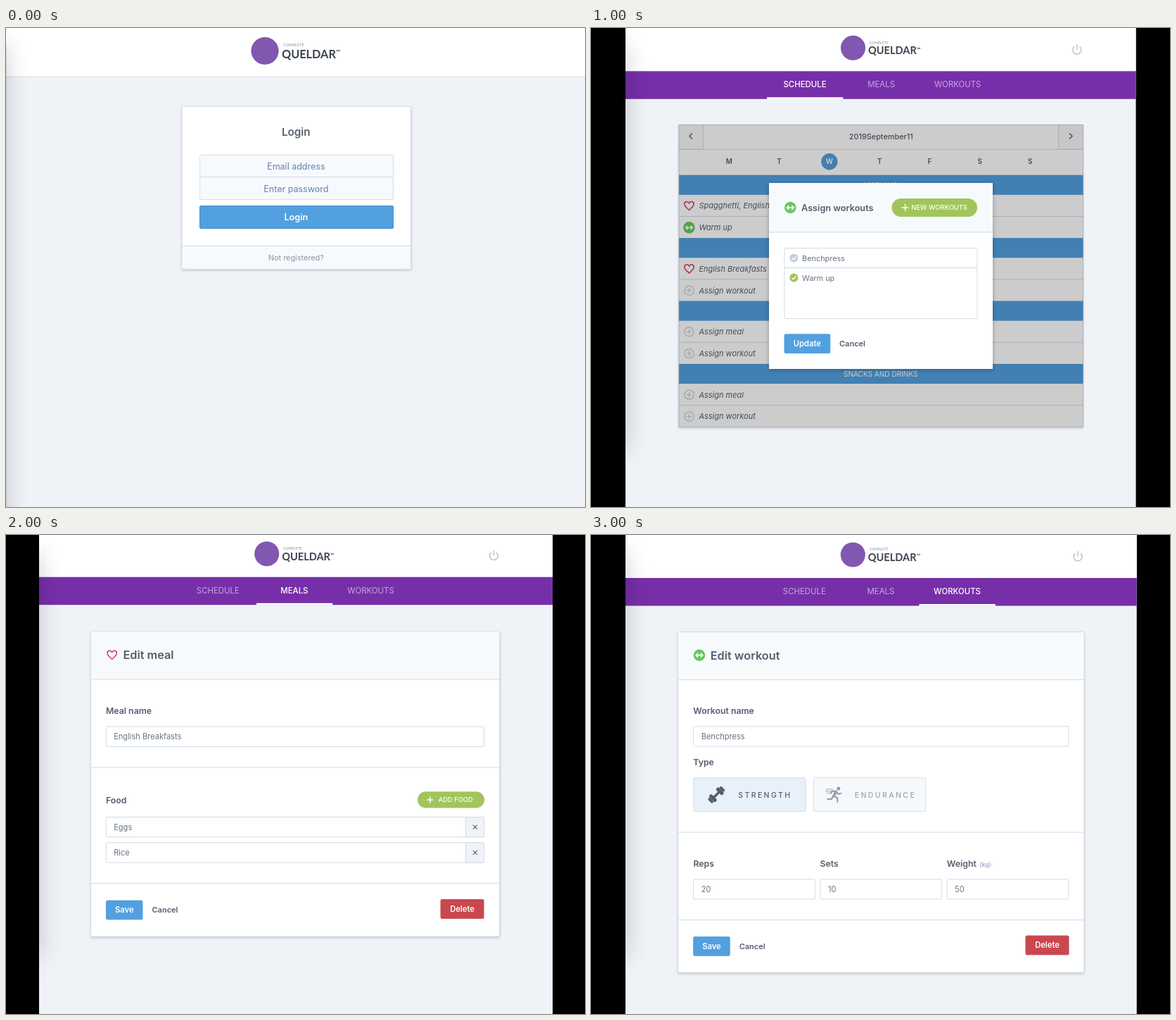
These frames come from a looping animation (823x680 px, 3.5 s). An HTML page with a canvas:

```html
<!DOCTYPE html>
<html lang="en">
<head>
<meta charset="utf-8">
<title>Fitness planner tour</title>
<style>
html, body { margin: 0; width: 100%; height: 100%; overflow: hidden; }
canvas { display: block; width: 823px; height: 680px; }
</style>
</head>
<body>
<canvas id="stage" width="823" height="680"></canvas>
<script>
const ctx = document.getElementById('stage').getContext('2d');
const W = 823, H = 680, HOLD = 500;
const C = {
  page: '#eff3f8', pale: '#f7fafd', line: '#d2dbe5', ink: '#545e6f', soft: '#687384',
  hint: '#a0aec4', blue: '#52a0e0', purple: '#772fa9', lime: '#a1c55c',
  green: '#67c85d', red: '#c9474f', pink: '#d13a65', grey: '#c4cbd6', logo: '#8157b0'
};

function text(str, x, y, size, o = {}) {
  ctx.font = `${o.italic ? 'italic ' : ''}${o.weight || 400} ${size}px ${o.font || 'Inter'}, sans-serif`;
  ctx.textAlign = o.align || 'left';
  ctx.letterSpacing = (o.spacing || 0) + 'px';
  ctx.fillStyle = o.color || C.ink;
  ctx.fillText(str, x, y + size * 0.36);
  ctx.letterSpacing = '0px';
}
const center = (str, x, y, size, o) => text(str, x, y, size, { align: 'center', ...o });

function rect(l, t, r, b, fill) {
  ctx.fillStyle = fill;
  ctx.fillRect(l, t, r - l, b - t);
}

function box(l, t, r, b, fill, border = C.line, radius = 1.5) {
  ctx.beginPath();
  ctx.roundRect(l + 0.5, t + 0.5, r - l - 1, b - t - 1, radius);
  ctx.fillStyle = fill;
  ctx.fill();
  ctx.lineWidth = 1;
  ctx.strokeStyle = border;
  ctx.stroke();
}

function shadowed(blur, dy, color, draw) {
  ctx.save();
  ctx.shadowColor = color;
  ctx.shadowBlur = blur;
  ctx.shadowOffsetY = dy;
  draw();
  ctx.restore();
}

function card(l, t, r, b) {
  shadowed(4, 1.5, 'rgba(0,0,0,.2)', () => rect(l + 0.5, t + 0.5, r - 0.5, b - 0.5, '#fff'));
  box(l, t, r, b, '#fff');
}

const hLine = (l, r, y) => rect(l, y - 0.5, r, y + 0.5, C.line);
const vLine = (x, t, b) => rect(x - 0.5, t, x + 0.5, b, C.line);

function disc(x, y, r, fill) {
  ctx.beginPath();
  ctx.arc(x, y, r, 0, Math.PI * 2);
  ctx.fillStyle = fill;
  ctx.fill();
}

function stroke(color, width, ...paths) {
  ctx.beginPath();
  for (const points of paths) points.forEach(([x, y], i) => i ? ctx.lineTo(x, y) : ctx.moveTo(x, y));
  ctx.strokeStyle = color;
  ctx.lineWidth = width;
  ctx.stroke();
}

function at(x, y, draw, scale = 1, angle = 0) {
  ctx.save();
  ctx.translate(x, y);
  ctx.scale(scale, scale);
  ctx.rotate(angle);
  draw();
  ctx.restore();
}

const plus = (x, y, r, color, width) =>
  stroke(color, width, [[x - r, y], [x + r, y]], [[x, y - r], [x, y + r]]);

const heart = (x, y, s = 1) => at(x, y, () => {
  ctx.beginPath();
  ctx.moveTo(0, 6);
  ctx.bezierCurveTo(-4, 2.5, -6.7, 0.6, -6.7, -2.4);
  ctx.bezierCurveTo(-6.7, -6.6, -1.8, -7.2, 0, -3.8);
  ctx.bezierCurveTo(1.8, -7.2, 6.7, -6.6, 6.7, -2.4);
  ctx.bezierCurveTo(6.7, 0.6, 4, 2.5, 0, 6);
  ctx.closePath();
  ctx.strokeStyle = C.pink;
  ctx.lineWidth = 1.5;
  ctx.stroke();
}, s);

const workoutIcon = (x, y) => at(x, y, () => {
  disc(0, 0, 8.3, C.green);
  stroke('#fff', 1.7, [[-4, 0], [4, 0]], [[-2, -2.8], [-4.8, 0], [-2, 2.8]], [[2, -2.8], [4.8, 0], [2, 2.8]]);
});

function addIcon(x, y) {
  ctx.beginPath();
  ctx.arc(x, y, 6.6, 0, Math.PI * 2);
  ctx.strokeStyle = C.grey;
  ctx.lineWidth = 1.2;
  ctx.stroke();
  plus(x, y, 3.6, C.grey, 1.2);
}

function check(x, y, color) {
  disc(x, y, 6.1, color);
  stroke('#fff', 1.4, [[x - 2.9, y + 0.2], [x - 0.9, y + 2.2], [x + 3, y - 2]]);
}

function trash(x, y) {
  rect(x - 5.2, y - 6.6, x + 5.2, y - 5, C.red);
  rect(x - 2, y - 7.3, x + 2, y - 6, C.red);
  ctx.beginPath();
  ctx.roundRect(x - 4.5, y - 4.2, 9, 11, [0, 0, 1.5, 1.5]);
  ctx.fillStyle = C.red;
  ctx.fill();
}

function power(x, y) {
  ctx.beginPath();
  ctx.arc(x, y + 0.5, 6, -0.9, Math.PI + 0.9);
  ctx.strokeStyle = '#c4c5c8';
  ctx.lineWidth = 1.6;
  ctx.stroke();
  stroke('#c4c5c8', 1.6, [[x, y - 7.3], [x, y]]);
}

const dumbbell = (x, y) => at(x, y, () => {
  rect(-6, -1.7, 6, 1.7, C.ink);
  for (const side of [-1, 1]) {
    box(side * 7 - 2.6, -6.3, side * 7 + 2.6, 6.3, C.ink, C.ink);
    box(side * 11.5 - 2, -4.5, side * 11.5 + 2, 4.5, C.ink, C.ink);
  }
}, 1, -Math.PI / 4);

const runner = (x, y) => at(x, y, () => {
  const tone = '#939daa';
  ctx.lineJoin = ctx.lineCap = 'round';
  disc(6.5, -8.7, 2.5, tone);
  stroke(tone, 3.6, [[3, -4.5], [-0.5, 2]]);
  stroke(tone, 2.2, [[2.5, -5], [-2.5, -5.5], [-4.5, -2]], [[3.5, -4], [6, -1], [10, -2]],
    [[0, 2], [5, 4.5], [5, 10]], [[-1, 2], [-3.5, 6], [-9, 6]]);
  stroke(tone, 0.9, [[-11, -8], [-2, -8]], [[-12, -5.2], [-5, -5.2]], [[-10, -2.4], [-6, -2.4]]);
});

function pill(l, t, r, b, label, labelX, size = 9.3) {
  const y = (t + b) / 2;
  ctx.beginPath();
  ctx.roundRect(l, t, r - l, b - t, (b - t) / 2);
  ctx.fillStyle = C.lime;
  ctx.fill();
  plus(labelX - (size > 9.3 ? 8.7 : 11.7), y, size > 9.3 ? 5 : 4.5, '#fff', 1.5);
  text(label, labelX, y, size, { color: '#fff', weight: 500 });
}

function button(l, t, r, b, label, fill = C.blue) {
  box(l, t, r, b, fill, fill);
  center(label, (l + r) / 2, (t + b) / 2, 11.2, { color: '#fff', weight: 600 });
}

const label = (str, x, y, size = 12.3) => text(str, x, y, size, { weight: 600 });

function field(l, t, r, b, value) {
  box(l, t, r, b, '#fff');
  text(value, l + 11.5, (t + b) / 2, 11.05, { color: C.soft });
}

const logo = (x, y, scale) => at(x, y, () => {
  disc(0, 0, 19.6, C.logo);
  text('COMPLETE', 26, -8.5, 6.1, { font: 'Lato', italic: true, color: '#8c8f98' });
  text('QUELDAR', 24, 4.4, 16.3, { font: 'Lato', weight: 700, color: '#3c4350' });
  text('™', 101, 2, 8, { font: 'Lato', weight: 700, color: '#3c4350' });
}, scale);

// Soft shadow cast onto the page by a window to its left.
function edgeShade(left, top, bottom) {
  ctx.save();
  ctx.beginPath();
  ctx.rect(left, 0, W, H);
  ctx.clip();
  shadowed(32, 0, 'rgba(0,0,0,.2)', () => rect(left - 200, top, left, bottom, '#000'));
  ctx.restore();
}

function shell({ left, right, nav, tabs, active, logoX, side = '#000' }) {
  rect(0, 0, W, H, side);
  rect(left, 0, right, H, C.page);
  rect(left, 0, right, nav, '#fff');
  rect(left, nav, right, nav + 39.5, C.purple);
  logo(logoX, nav - 33, 0.895);
  power(right - 83.7, nav - 30.7);
  ['SCHEDULE', 'MEALS', 'WORKOUTS'].forEach((name, i) => {
    const x = tabs + i * 108.6, on = i === active;
    center(name, x, nav + 19, 11.4, { color: on ? '#fff' : '#c6a6dc', weight: on ? 500 : 400 });
    if (on) rect(x - 54, nav + 37, x + 54.3, nav + 39.7, '#fff');
  });
  edgeShade(left, 25, 600);
}

function panelHead(l, t, r, title, icon) {
  rect(l + 1, t + 1, r - 1, t + 68, C.pale);
  hLine(l, r, t + 68.5);
  icon(l + 30.7, t + 33.7);
  text(title, l + 46.4, t + 34, 16.3, { weight: 600 });
}

function listPanel(l, t, r, title, icon, items) {
  card(l, t, r, t + 159.7);
  panelHead(l, t, r, title, icon);
  items.forEach(([name, detail], i) => {
    const y = t + 68.5 + i * 45.5;
    rect(r - 40, y + 0.5, r - 1, y + 45, C.pale);
    vLine(r - 40, y, y + 45.5);
    if (i) hLine(l, r, y);
    trash(r - 20, y + 22);
    text(name, l + 14.3, y + 17.2, 11.05);
    text(detail, l + 14.3, y + 30.5, 8.6, { italic: true, color: C.hint });
  });
}

function formButtons(l, y) {
  button(l, y - 14, l + 52.5, y + 13.7, 'Save');
  text('Cancel', l + 65.5, y, 11, { weight: 600 });
  button(617.5, y - 15.5, 679.5, y + 12.3, 'Delete', C.red);
}

function schedule() {
  const l = 123, r = 701;
  card(l, 137, r, 569);
  for (const [a, b] of [[l, l + 36], [r - 36, r]]) box(a, 137, b, 173, '#f8f9fa');
  hLine(l, r, 172.5);
  stroke(C.ink, 1.4, [[142.5, 149.5], [138.5, 153.5], [142.5, 157.5]], [[681, 149.5], [685, 153.5], [681, 157.5]]);
  center('2019September11', 412, 154, 10.9, { weight: 500 });
  disc(338.3, 190, 11.7, C.blue);
  [...'MTWTFSS'].forEach((day, i) =>
    center(day, 195 + i * 71.65, 190, 10, { weight: 600, color: i === 2 ? '#fff' : C.ink }));

  const sections = [
    ['MORNING', 'Spagghetti, English Breakfasts', 'Warm up'],
    ['LUNCH', 'English Breakfasts', 'Assign workout'],
    ['EVENING', 'Assign meal', 'Assign workout'],
    ['SNACKS AND DRINKS', 'Assign meal', 'Assign workout']
  ];
  sections.forEach(([name, meal, workout], i) => {
    const y = 209 + i * 89.8;
    rect(l + 0.5, y, r - 0.5, y + 28.3, C.blue);
    center(name, 411.5, y + 14.3, 10.1, { color: '#fff' });
    hLine(l, r, y + 59);
    [meal, workout].forEach((item, j) => {
      const mid = y + 44 + j * 31;
      const icon = item.startsWith('Assign') ? addIcon : j ? workoutIcon : heart;
      icon(138, mid);
      text(item, 152, mid, 11.05, { italic: true });
    });
  });
}

function loginScene() {
  rect(0, 0, W, H, C.page);
  rect(0, 0, W, 69, '#fff');
  hLine(0, W, 69.5);
  logo(368, 32.5, 1);
  edgeShade(0, 25, 900);
  rect(0, 25, 1, H, 'rgba(0,0,0,.1)');
  card(249.5, 111, 576, 343);
  rect(250.5, 310, 575, 342, C.pale);
  hLine(250, 575.5, 309.5);
  center('Login', 412.3, 148, 15.2, { weight: 600 });
  box(275, 179.5, 551, 244, C.pale, '#d5dfec');
  hLine(275, 551, 211.5);
  center('Email address', 412.3, 196, 12.5, { color: '#667fae' });
  center('Enter password', 412.3, 228, 12.5, { color: '#667fae' });
  box(275, 252, 551, 285, C.blue, '#478fcb');
  center('Login', 412.3, 268.5, 12.6, { color: '#fff', weight: 600 });
  center('Not registered?', 412.3, 326.3, 10.9, { color: '#8a94a3' });
}

function scheduleScene() {
  shell({ left: 48, right: 776, nav: 61, tabs: 303, active: 0, logoX: 372, side: '#383d4b' });
  schedule();
}

function assignScene() {
  shell({ left: 49, right: 774.5, nav: 61.3, tabs: 304, active: 0, logoX: 372.5 });
  at(2.1, 0.6, schedule, 0.9955);
  rect(124.5, 137, 700, 567, 'rgba(0,0,0,.2)');
  shadowed(6, 1, 'rgba(0,0,0,.3)', () => rect(253, 220, 571, 484, '#fff'));
  rect(253, 220, 571, 290, C.pale);
  hLine(253, 571, 290);
  workoutIcon(283.3, 255);
  label('Assign workouts', 299, 255, 12.7);
  pill(427.5, 242, 549, 268, 'NEW WORKOUTS', 455.3, 9.4);
  box(274.5, 312, 549.5, 413, '#fff');
  hLine(275, 549, 340.5);
  check(288.4, 326.5, '#c2cfdb');
  text('Benchpress', 300, 326.8, 10.9, { color: C.soft });
  check(288.4, 354.5, C.lime);
  text('Warm up', 300, 354.8, 10.9, { color: C.soft });
  button(274.5, 434.3, 340.3, 462, 'Update');
  label('Cancel', 353, 448.5, 11);
}

function mealsScene() {
  shell({ left: 46, right: 777, nav: 60, tabs: 303, active: 1, logoX: 372 });
  listPanel(122.7, 136.5, 701.8, 'Your meals', heart, [
    ['English Breakfasts', 'Eggs, Rice'],
    ['Spagghetti', 'Condensada, Dorvel Cream, Tomato Sauce']
  ]);
  pill(584, 158.7, 679.5, 182, 'NEW MEAL', 613.7);
}

function editMealScene() {
  shell({ left: 47, right: 777, nav: 59.7, tabs: 301.3, active: 1, logoX: 370.7 });
  card(120, 136.5, 702, 570.5);
  panelHead(120, 136.5, 702, 'Edit meal', heart);
  label('Meal name', 142, 250);
  field(141.7, 271.5, 680, 301, 'English Breakfasts');
  hLine(120, 702, 330);
  label('Food', 142, 376.5);
  pill(585, 364.3, 680, 387.5, 'ADD FOOD', 614.5);
  ['Eggs', 'Rice'].forEach((food, i) => {
    const y = 400 + i * 36.3;
    field(141.7, y, 680, y + 29.2, food);
    box(653, y, 680, y + 29.2, C.page);
    stroke(C.ink, 1.2, [[663.8, y + 11.6], [669.8, y + 17.6]], [[669.8, y + 11.6], [663.8, y + 17.6]]);
  });
  hLine(120, 702, 494.5);
  formButtons(142, 532.5);
}

function workoutsScene() {
  shell({ left: 48, right: 776, nav: 61, tabs: 301.3, active: 2, logoX: 370.5 });
  listPanel(120.5, 137.5, 700.7, 'Your workouts', workoutIcon, [
    ['Benchpress', 'Weight: 50kg, Reps: 20, Sets: 10'],
    ['Warm up', 'Distance: 10km, Duration: 20mins']
  ]);
  pill(560, 159.8, 678.3, 183, 'NEW WORKOUT', 589.5);
}

function editWorkoutScene() {
  shell({ left: 49, right: 775.7, nav: 61, tabs: 303.3, active: 2, logoX: 372.3 });
  card(123.3, 137, 701.3, 621.5);
  panelHead(123.3, 137, 701.3, 'Edit workout', workoutIcon);
  label('Workout name', 145.3, 249.8);
  field(145.2, 271.3, 679.3, 300.5, 'Benchpress');
  label('Type', 145.3, 322.7);
  box(145.2, 344.3, 305.7, 393, '#e8f1f9', '#cfdeeb');
  dumbbell(178.3, 368.7);
  text('STRENGTH', 209.3, 369, 10.5, { weight: 500, spacing: 2.4 });
  box(316, 344.3, 476.3, 393, '#f6f9fc', '#d6e0ea');
  runner(345.3, 368.8);
  text('ENDURANCE', 374.7, 369, 10.5, { weight: 500, spacing: 2.4, color: '#99a2af' });
  hLine(123.3, 701.3, 422);
  [['Reps', '20'], ['Sets', '10'], ['Weight', '50']].forEach(([name, value], i) => {
    const x = 145.2 + i * 180.2;
    label(name, x + 0.2, 466.7);
    field(x, 488.2, x + 173.5, 517.5, value);
  });
  text('(kg)', 552.2, 468, 8.6, { weight: 600, color: C.hint });
  hLine(123.3, 701.3, 546.5);
  formButtons(145.2, 584);
}

const scenes = [loginScene, scheduleScene, assignScene, mealsScene, editMealScene, workoutsScene, editWorkoutScene];
const start = performance.now();

function frame() {
  const step = Math.floor((performance.now() - start) / HOLD) % scenes.length;
  ctx.save();
  scenes[step]();
  ctx.restore();
  requestAnimationFrame(frame);
}
frame();
</script>
</body>
</html>
```
